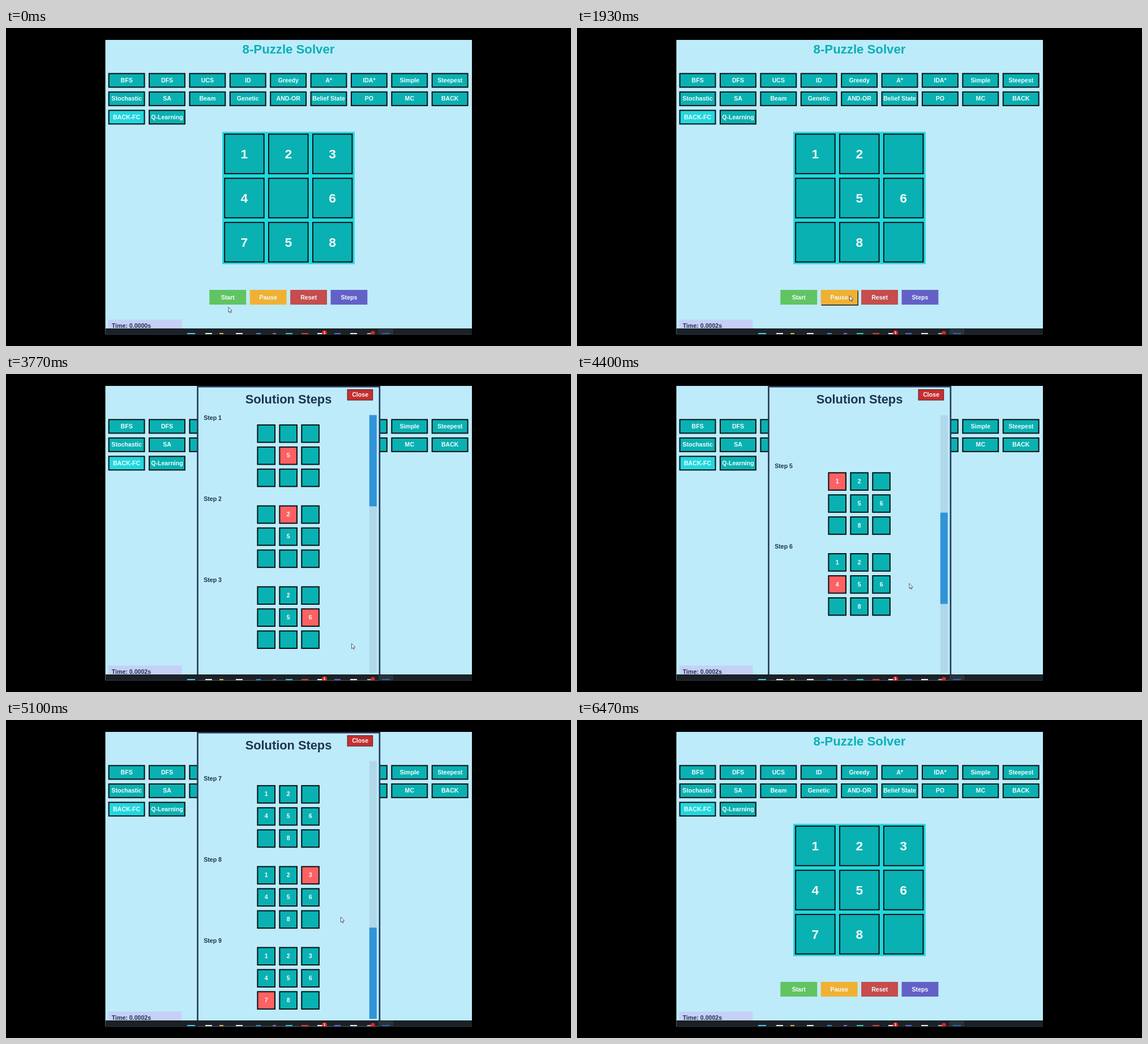
An HTML page with a canvas that plays this animation: 998 by 561 pixels, repeating every 6500 ms.

```html
<!DOCTYPE html>
<html lang="en">
<head>
<meta charset="utf-8">
<title>8-Puzzle Solver</title>
<style>
html, body { margin: 0; width: 100%; height: 100%; overflow: hidden; background: #000; }
canvas { display: block; }
</style>
</head>
<body>
<canvas id="stage" width="998" height="561"></canvas>
<script>
const ctx = document.getElementById('stage').getContext('2d');
const LOOP = 6500;
const UNIT = 0.649;               // app pixel to stage pixel
const ROW = 220 * UNIT;           // height of one listed step
const MAX_SCROLL = 1280;
const FIRST_STEP = 540, STEP_TIME = 310;
const OPEN = 3250, CLOSE = 6060;

const C = {
  sky: '#bdebfa', teal: '#0ab1b2', bright: '#22d7de', title: '#08b0b4',
  navy: '#1f3350', red: '#fe6163', thumb: '#3193d8', track: '#b0d8e9',
  time: '#c6d0f6', bar: '#1b2126'
};

const METHODS = ['BFS', 'DFS', 'UCS', 'ID', 'Greedy', 'A*', 'IDA*', 'Simple', 'Steepest',
  'Stochastic', 'SA', 'Beam', 'Genetic', 'AND-OR', 'Belief State', 'PO', 'MC', 'BACK',
  'BACK-FC', 'Q-Learning'];
const CONTROLS = [['Start', '#61c462'], ['Pause', '#f0b133'], ['Reset', '#c64c4d'], ['Steps', '#6361c6']];

const START_BOARD = '1234 6758';
// The solver places one digit per step; 0 repeats the board.
const BOARDS = [];
[5, 2, 6, 8, 1, 4, 0, 3, 7].reduce((cells, digit) => {
  const next = cells.slice();
  if (digit) next[digit - 1] = String(digit);
  BOARDS.push({ cells: next, fresh: digit - 1 });
  return next;
}, Array(9).fill(' '));

// time, x, y of the pointer tip
const POINTER = [
  [0, 393, 492.5], [150, 393, 492.5], [420, 384, 480.5], [1500, 384, 480.5],
  [2450, 610.5, 461.3], [2900, 610.5, 461.3], [3120, 610.5, 475.5], [3850, 610.5, 475.5],
  [4400, 587, 369.5], [5000, 587, 369.5], [5600, 645.5, 80.5], [5750, 645.5, 80.5],
  [5960, 626, 38], [6120, 626, 38], [6330, 634, 5]
];

// time, scroll offset in app pixels
const SCROLL = [[3900, 0], [4600, 1100], [4850, 1100], [5100, MAX_SCROLL]];

function track(keys, t, ease) {
  if (t <= keys[0][0]) return keys[0].slice(1);
  for (let i = 1; i < keys.length; i++) {
    const a = keys[i - 1], b = keys[i];
    if (t < b[0]) {
      const k = ease((t - a[0]) / (b[0] - a[0]));
      return a.slice(1).map((v, j) => v + (b[j + 1] - v) * k);
    }
  }
  return keys[keys.length - 1].slice(1);
}
const smooth = k => k * k * (3 - 2 * k);
const linear = k => k;

function box(x, y, w, h, color) {
  ctx.fillStyle = color;
  ctx.fillRect(x, y, w, h);
}

function framed(x, y, w, h, color, line = 2, edge = '#071013') {
  box(x, y, w, h, edge);
  box(x + line, y + line, w - 2 * line, h - 2 * line, color);
}

function label(str, x, y, size = 10.6, color = '#f2fbfb', align = 'center') {
  ctx.font = `bold ${size}px "Liberation Sans", Arial, sans-serif`;
  ctx.textAlign = align;
  ctx.fillStyle = color;
  ctx.fillText(str, x, y + size * 0.36);
}

function drawMethods() {
  METHODS.forEach((name, i) => {
    const x = 180.6 + (i % 9) * 110 * UNIT;
    const y = 79.4 + Math.floor(i / 9) * 50 * UNIT;
    framed(x, y, 64.9, 26, name === 'BACK-FC' ? C.bright : C.teal);
    label(name, x + 32.5, y + 12.5);
  });
}

function drawGrid(cells, x, y, pitch, size, font, fresh = -1) {
  for (let i = 0; i < 9; i++) {
    const cx = x + (i % 3) * pitch, cy = y + Math.floor(i / 3) * pitch;
    framed(cx, cy, size, size, i === fresh ? C.red : C.teal);
    if (cells[i] !== ' ') label(cells[i], cx + size / 2, cy + size / 2 - 0.5, font);
  }
}

function drawControls(px, py) {
  CONTROLS.forEach(([name, color], i) => {
    const x = 359.3 + i * 110 * UNIT, y = 462;
    const hover = px >= x && px < x + 65 && py >= y && py < y + 26;
    if (hover) box(x + 1, y + 1.3, 65.2, 26.2, '#0a1410');
    box(x, y, 64.9, 26, color);
    label(name, x + 32.5, y + 12.8);
  });
}

function drawDialog(scroll) {
  framed(337.2, 21, 324, 530, C.sky, 2.6, '#23365a');
  label('Solution Steps', 499, 44, 21.8, C.navy);
  framed(602.6, 27, 45.6, 19.6, '#c62f30', 1, '#5a1a22');
  label('Close', 625.6, 36.6);

  const top = 72.5, bottom = 527.2, thumb = 161;
  BOARDS.forEach((board, i) => {
    const y = top + i * ROW - scroll * UNIT;
    if (y < top - 0.5 || y + ROW > bottom) return;   // only whole steps are listed
    label('Step ' + (i + 1), 349.2, y + 5, 10.6, C.navy, 'left');
    drawGrid(board.cells, 443.4, y + 16.4, 60 * UNIT, 32.6, 10.6, board.fresh);
  });
  box(641.8, top, 13, bottom - top, C.track);
  box(641.8, top + (bottom - top - thumb) * scroll / MAX_SCROLL, 13, thumb, C.thumb);
}

function drawTaskbar() {
  box(175.5, 530, 647.5, 10.3, C.bar);
  box(658, 531, 26, 9.3, '#29333b');
  const icons = [[320, 14, '#4cc3e8'], [352, 12, '#e4e8ea'], [377, 7, '#d8b04a'], [406, 12, '#e4e8ea'],
    [442, 8, '#2f8fd0'], [471, 6, '#8a62b8'], [494, 12, '#35c4bd'], [522, 12, '#d23b35'],
    [550, 10, '#f0f0f0'], [580, 11, '#5a62d8'], [608, 12, '#e4e8ea'], [638, 8, '#a9b0b5'],
    [664, 14, '#2a64a8']];
  icons.forEach(([x, w, color]) => box(x, 538, w, 2.3, color));
  ctx.fillStyle = '#e5231f';
  for (const [x, r] of [[562.5, 4.6], [648, 3.6]]) {
    ctx.beginPath();
    ctx.arc(x, 538, r, 0, 7);
    ctx.fill();
  }
  label('1', 562.5, 537.8, 6.5, '#fff');
}

function drawPointer(x, y) {
  const shape = [[0, 0], [0, 9], [2, 7.2], [3.4, 10.2], [4.8, 9.6], [3.5, 6.6], [6.2, 6.4]];
  ctx.beginPath();
  shape.forEach(([dx, dy]) => ctx.lineTo(x + dx, y + dy));
  ctx.closePath();
  ctx.fillStyle = '#fff';
  ctx.fill();
  ctx.lineWidth = 0.8;
  ctx.strokeStyle = '#26323c';
  ctx.stroke();
}

function draw(t) {
  const [px, py] = track(POINTER, t, smooth);
  const step = Math.min(BOARDS.length - 1, Math.floor((t - FIRST_STEP) / STEP_TIME));
  const started = step >= 0;

  box(0, 0, 998, 561, '#000');
  ctx.save();
  ctx.beginPath();
  ctx.rect(175.5, 21, 647.5, 519.3);
  ctx.clip();

  box(175, 20, 649, 522, C.sky);
  label('8-Puzzle Solver', 499, 37.2, 22.2, C.title);
  drawMethods();
  box(382, 183.2, 233.8, 233.4, C.bright);
  drawGrid(started ? BOARDS[step].cells : START_BOARD, 385.1, 186.3, 120 * UNIT, 71.6, 22.8);
  drawControls(px, py);
  box(180.6, 514.4, 129.8, 20, C.time);
  label(started ? 'Time: 0.0002s' : 'Time: 0.0000s', 186.8, 525.2, 10.6, C.navy, 'left');

  if (t >= OPEN && t < CLOSE) {
    const [raw] = track(SCROLL, t, linear);
    drawDialog(raw >= MAX_SCROLL ? MAX_SCROLL : Math.floor(raw / 50) * 50);
  }
  drawTaskbar();
  drawPointer(px, py);
  ctx.restore();
}

function tick() {
  draw(performance.now() % LOOP);
  requestAnimationFrame(tick);
}
tick();
</script>
</body>
</html>
```
